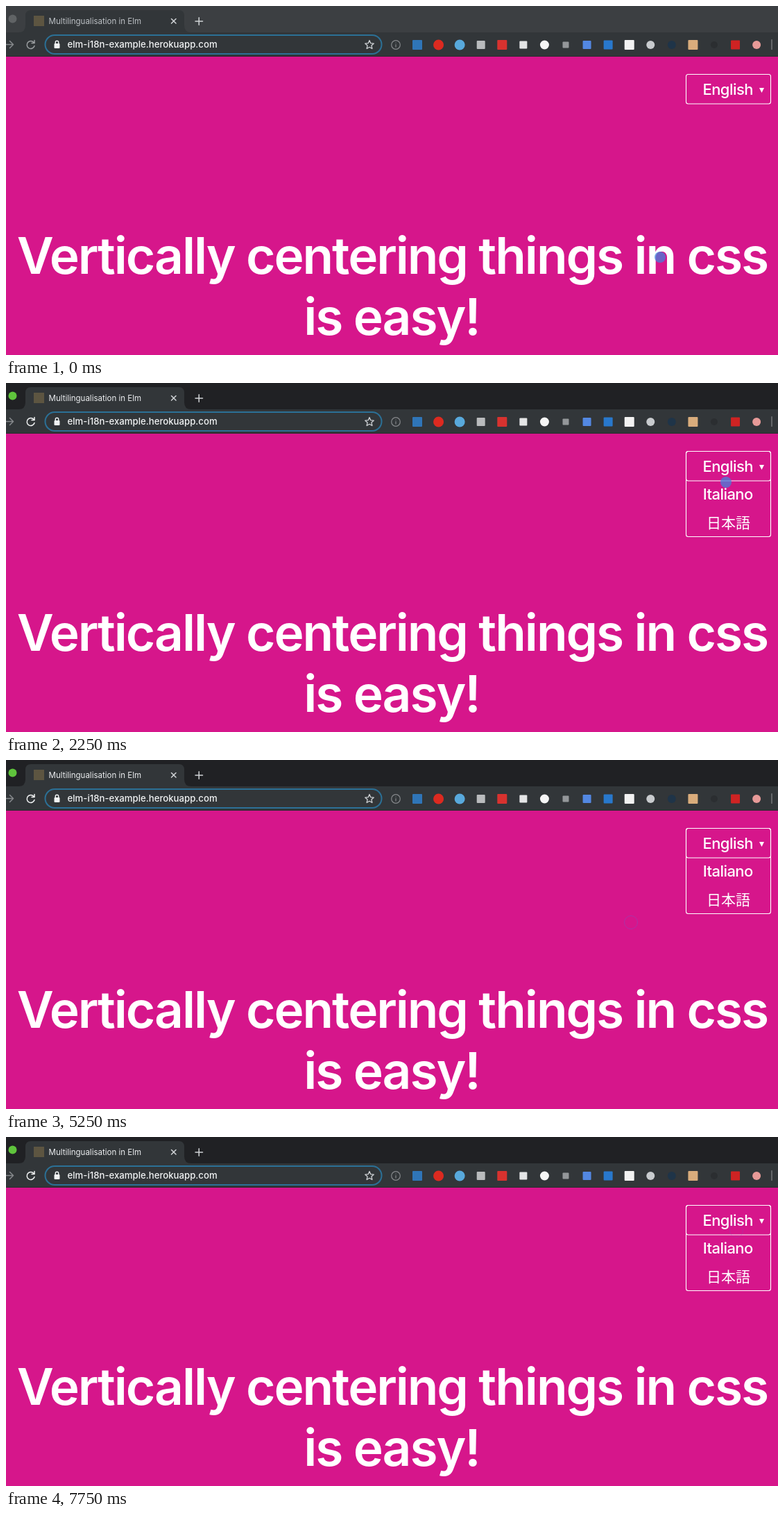
An HTML page for the animation above (8000 ms loop, 1113x503 px).

```html
<!DOCTYPE html>
<html lang="en">
<head>
<meta charset="utf-8">
<title>Multilingualisation in Elm</title>
<style>
  html, body { margin: 0; width: 100%; height: 100%; overflow: hidden; background: #d6168b; }
  svg { display: block; width: 1113px; height: 503px; font-family: Inter, "Liberation Sans", sans-serif; font-optical-sizing: none; }

  .browser { animation: focus 8s step-end infinite; }
  .strip { fill: var(--strip); }
  .light { fill: var(--light); }
  .title { fill: var(--title); font-size: 11.5px; }
  .reload { stroke: var(--reload); }
  .bar { fill: #323639; }
  .url { fill: #f1f3f4; font-size: 13.2px; font-weight: 500; }
  .line { fill: none; stroke-width: 1.5; stroke-linecap: round; stroke-linejoin: round; }

  .heading { fill: #fff; font-size: 73px; font-weight: 600; letter-spacing: -.028em; text-anchor: middle; }
  .lang { fill: #fff; font-size: 22px; font-weight: 500; letter-spacing: -.025em; text-anchor: middle; }
  .cjk { font: 500 21px "Noto Sans CJK JP", "Noto Sans CJK", sans-serif; letter-spacing: 0; }
  .frame { fill: none; stroke: #fff; stroke-width: 1.1; }
  .menu { animation: menu 8s step-end infinite; }

  .cursor { animation: move 8s step-end infinite; }
  .dot { fill: #4084de; animation: dot 8s step-end infinite; }
  .ring { fill: none; stroke: #7858c8; animation: ring 8s step-end infinite; }

  @keyframes focus {
    0% { --strip: #3c3f42; --light: #606365; --title: #bdc1c5; --reload: #9b9ea1; }
    18.75%, 100% { --strip: #202124; --light: #5fc43c; --title: #eceef0; --reload: #f1f3f4; }
  }
  @keyframes menu {
    0%, 50%, 68.75% { visibility: hidden; }
    21.875%, 59.375%, 96.875%, 100% { visibility: visible; }
  }
  @keyframes move {
    0% { transform: translate(943px, 362px); }
    3.125% { transform: translate(943px, 189px); }
    9.375% { transform: translate(1000px, 148px); }
    12.5% { transform: translate(1044px, 117px); }
    18.75% { transform: translate(1040px, 136px); }
    25% { transform: translate(1038px, 143px); }
    31.25% { transform: translate(1037px, 147px); }
    34.375% { transform: translate(1038px, 141px); }
    37.5% { transform: translate(1041px, 132px); }
    40.625% { transform: translate(1043px, 125px); }
    62.5% { transform: translate(975px, 170px); }
    65.625% { transform: translate(901px, 234px); }
    68.75% { transform: translate(890px, 246px); }
    71.875% { transform: translate(882px, 254px); }
    75% { transform: translate(878px, 257px); }
    78.125% { transform: translate(895px, 242px); }
    81.25% { transform: translate(985px, 165px); }
    84.375% { transform: translate(1057px, 116px); }
    93.75% { transform: translate(1055px, 125px); }
    96.875%, 100% { transform: translate(1053px, 135px); }
  }
  @keyframes dot {
    0%, 21.875%, 50%, 59.375%, 68.75% { opacity: .72; }
    18.75%, 46.875%, 56.25%, 65.625%, 96.875%, 100% { opacity: 0; }
  }
  @keyframes ring {
    0%, 21.875%, 50%, 59.375%, 68.75% { opacity: 0; }
    18.75%, 46.875%, 56.25% { opacity: .6; }
    65.625% { opacity: .45; }
    96.875%, 100% { opacity: .25; }
  }
</style>
</head>
<body>
<svg viewBox="0 0 1113 503">
  <rect width="1113" height="503" fill="#d6168b"/>

  <g class="browser">
    <rect class="strip" width="1113" height="38"/>
    <rect class="bar" y="38" width="1113" height="35"/>
    <rect y="72" width="1113" height="1" fill="#282b2d"/>
    <path class="bar" d="M18 38Q28 38 28 28V14Q28 6 36 6H249Q257 6 257 14V28Q257 38 267 38Z"/>
    <circle class="light" cx="9.5" cy="18.5" r="6"/>
    <rect x="40" y="14" width="15" height="15" fill="#5d5541"/>
    <text class="title" x="61.5" y="26">Multilingualisation in Elm</text>
    <path class="line" stroke="#d0d3d6" d="M238.5 18.5l6.5 6.5m0-6.5l-6.5 6.5M273 22h10.5M278.2 16.8v10.5"/>

    <path class="line" stroke="#85888b" d="M-2 55.5H10M5.5 50.5l5 5l-5 5"/>
    <path class="line reload" d="M40 52.5A5.5 5.5 0 1 0 41 57.5M41 49.5V53.5H37"/>
    <rect x="56.5" y="42" width="485" height="27" rx="13.5" fill="#323639" stroke="#2b7096" stroke-width="2"/>
    <rect x="69.5" y="54" width="8" height="7" rx="1" fill="#f1f3f4"/>
    <path class="line" stroke="#f1f3f4" d="M71.3 54V52.5a2.2 2.2 0 0 1 4.4 0V54"/>
    <text class="url" x="88.5" y="60.3">elm-i18n-example.herokuapp.com</text>
    <path class="line" stroke="#d0d3d6" style="stroke-width:1.3" d="M524 49.5l1.8 4.2 4.5.4-3.4 3 1 4.4-3.9-2.3-3.9 2.3 1-4.4-3.4-3 4.5-.4z"/>

    <g class="line" stroke="#85888b" style="stroke-width:1.2">
      <circle cx="562" cy="56" r="6.3"/>
      <path d="M562 55.5v3.5M562 53v.1M1104 48.5v14"/>
    </g>
    <g id="tools"></g>
  </g>

  <g class="frame">
    <rect x="980.5" y="98.5" width="122" height="42.5" rx="3"/>
    <rect class="menu" x="980.5" y="98.5" width="122" height="123" rx="3"/>
  </g>
  <text class="lang" x="1040.7" y="128">English</text>
  <path fill="#fff" d="M1086 118h7l-3.5 7z"/>
  <g class="menu">
    <text class="lang" x="1040.7" y="167.5">Italiano</text>
    <text class="lang cjk" x="1041.5" y="208.5" lang="ja">日本語</text>
  </g>

  <text class="heading" x="557" y="385.5">Vertically centering things in css</text>
  <text class="heading" x="556" y="473.5">is easy!</text>

  <g class="cursor">
    <circle class="dot" r="8"/>
    <circle class="ring" r="9.5"/>
  </g>
</svg>
<script>
  // Toolbar buttons, evenly spaced: shape, size, colour
  const tools = [
    ['rect', 14, '#2f75b8'], ['circle', 15, '#dc2a20'], ['circle', 15, '#58a9dc'],
    ['rect', 12, '#b9bbbd'], ['rect', 14, '#d8322f'], ['rect', 11, '#e4e5e6'],
    ['circle', 13, '#f6f6f6'], ['rect', 9, '#94979a'], ['rect', 12, '#5388e2'],
    ['rect', 13, '#2878cc'], ['rect', 14, '#f2f2f2'], ['circle', 12, '#c8cbce'],
    ['circle', 12, '#1f3448'], ['rect', 14, '#d9ac7c'], ['circle', 10, '#2b2e31'],
    ['rect', 13, '#cf2323'], ['circle', 12, '#e79a98']
  ];
  const group = document.getElementById('tools');
  tools.forEach(([shape, size, fill], i) => {
    const el = document.createElementNS('http://www.w3.org/2000/svg', shape);
    const x = 593 + i * 30.57, y = 56, r = size / 2;
    const box = shape === 'rect'
      ? { x: x - r, y: y - r, width: size, height: size, rx: 1 }
      : { cx: x, cy: y, r };
    for (const [name, value] of Object.entries({ ...box, fill })) el.setAttribute(name, value);
    group.append(el);
  });
</script>
</body>
</html>
```
